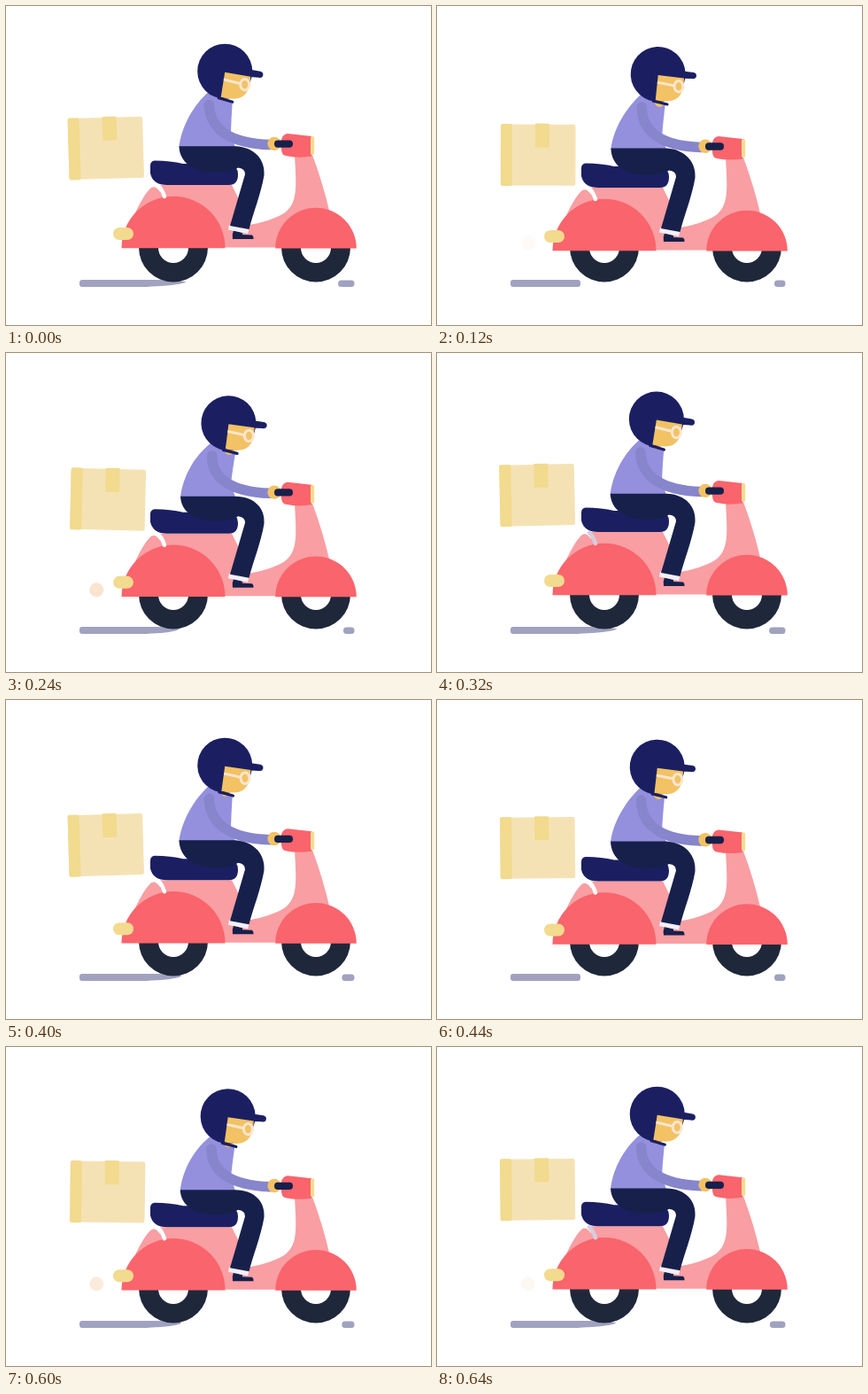
An HTML page with a canvas for the animation above (680 ms loop, 480 by 360 pixels).

```html
<!DOCTYPE html>
<html lang="en">
<head>
<meta charset="utf-8">
<title>Delivery scooter</title>
<style>
  html, body { margin: 0; width: 100%; height: 100%; overflow: hidden; background: #fff; }
  canvas { display: block; }
</style>
</head>
<body>
<canvas id="stage" width="480" height="360"></canvas>
<script>
const ctx = document.getElementById('stage').getContext('2d');
const LOOP = 680, PERIOD = 340, STEP = 40;
const NAVY = '#1b1f62', INK = '#17204b', CORAL = '#fa646c', PINK = '#f99ea2';
const SAND = '#f5e2b4', STRAW = '#f2da8e', SKIN = '#f2c264', SHADOW = '#a0a2c0';

const fill = (color, d) => { ctx.fillStyle = color; ctx.fill(new Path2D(d)); };

function line(color, width, d) {
  ctx.strokeStyle = color;
  ctx.lineWidth = width;
  ctx.lineCap = 'round';
  ctx.stroke(new Path2D(d));
}

function disc(color, x, y, r, start = 0) {
  ctx.fillStyle = color;
  ctx.beginPath();
  ctx.arc(x, y, r, start, 2 * Math.PI);
  ctx.fill();
}

function box(color, x, y, w, h, r = 0) {
  ctx.fillStyle = color;
  ctx.beginPath();
  ctx.roundRect(x, y, w, h, r);
  ctx.fill();
}

function group(x, y, angle, draw) {
  ctx.save();
  ctx.translate(x, y);
  ctx.rotate(angle);
  draw();
  ctx.restore();
}

// 0..1 wave that reaches 1 at the given moment of the bounce
const wave = (t, peak) => 0.5 + 0.5 * Math.cos(2 * Math.PI * (t - peak) / PERIOD);

function shadows(drop) {
  box(SHADOW, 83, 309, 79, 8, 3);
  if (drop < 0.65) {
    const end = 203 - 14 * drop;
    fill(SHADOW, `M155 309H170Q190 309 ${end} 311Q${end} 314 175 316L155 317Z`);
  }
  const left = 381 - 6 * Math.max(0, 1 - 2 * drop);
  box(SHADOW, left, 309.5, 393.5 - left, 7.5, 3.5);
}

function wheel(x) {
  disc('#1f283a', x, 272.5, 39);
  disc('#fff', x, 273, 17);
}

function scooter(phase) {
  fill(PINK, 'M134 262C144 236 154 214 164 205Q169 202 174 210L173 202H255L262 216L266 248Q288 246 306 238C331 228 328 207 326 168H346Q358 200 366 235V272.5H150Z');
  disc(CORAL, 189, 273.2, 58.5, Math.PI);
  disc(CORAL, 350, 273.5, 45.8, Math.PI);
  line(phase > 270 ? '#d5cce0' : '#fff', 4.5, 'M172 203Q176 206 179 215');
  box(STRAW, 121, 250, 23, 14, 7);
  fill(NAVY, 'M168 174.5Q186 174.5 200 178H251Q262 180 262 190Q262 202 252 202H182Q166 202 163 189V180Q163 175 168 174.5Z');
  fill(CORAL, 'M318 144L345 147V169.5Q330 172 316 169Q311 168 311 161V151Q312 145 318 144Z');
  box('#f3dc90', 344, 147, 4.2, 21, 2);
}

// hip and neck are offsets from the resting pose
function rider(hip, neck) {
  const waist = 158 + hip.y, back = 195.3 + hip.x;
  fill(INK, 'M257 253L267 256V258L278 258.5Q280 260 279.5 263H256Q255 258 257 253Z');
  fill('#f3eff8', 'M252 247L274.5 251L273 257L251 252.5Z');
  fill('#9490dd', `M${229 + neck.x} ${96 + neck.y}L${243 + neck.x} ${103 + neck.y}L${255.5 + neck.x} ${107 + neck.y}
    Q${254 + neck.x / 2} 130 254 146L259 ${waist + 1}H${back}C${198 + hip.x} 136 ${211 + neck.x} 112 ${229 + neck.x} ${96 + neck.y}Z`);
  line('#8785cb', 11.5, `M${229 + neck.x} ${111 + neck.y}C${230 + neck.x / 2} 138 252 155 298 156.5`);
  fill(INK, `M${back} ${waist}H259C281 ${159 + hip.y / 2} 293 174 291.5 191C288 212 279 234 274.5 252L253 248L270 190
    Q270 183 262 182.5Q257 187 240 188C214 189 ${196 + hip.x} 178 ${back} ${waist}Z`);
  disc(SKIN, 303, 155.3, 7.7);
  box(INK, 303, 151.4, 21, 8.3, 4);
}

// drawn around the helmet's centre
function head(drop) {
  disc(SKIN, 0, 28 + 4 * drop, 5.5);
  disc(NAVY, 0, 0, 31);
  fill(NAVY, 'M23 -3L40 0Q44 1 43 5Q42 8 38 7L25 6Z');
  fill(SKIN, 'M0 1L29 6Q28 31 10 31Q1 31 -4.5 29Z');
  line('#f9e6cf', 3, 'M0 9.5L16 13.5');
  line('#f9e6cf', 3, 'M17.5 15a5 6.2 0 1 0 10 0a5 6.2 0 1 0 -10 0');
  line(NAVY, 3.2, 'M-7 30L8.5 34.5');
}

function parcel() {
  box(SAND, -42, -34, 84.5, 69, 2);
  box(STRAW, -42, -34.5, 13, 70, 2);
  box(STRAW, -3, -35, 16, 27, 1);
}

function puff(phase) {
  const alpha = Math.min((phase - 100) / 110, (320 - phase) / 80, 1);
  if (alpha <= 0) return;
  ctx.globalAlpha = alpha;
  disc('#f9e4d0', phase < 210 ? 104 : 102.3, 267.3, 8);
  ctx.globalAlpha = 1;
}

function draw(t) {
  const phase = t % PERIOD;
  const drop = wave(t, 160), lag = wave(t, 200);
  const bodyY = 3.4 * drop, headX = 5.3 * lag, headY = 6.9 * lag;

  ctx.fillStyle = '#fff';
  ctx.fillRect(0, 0, 480, 360);
  shadows(drop);
  wheel(189);
  wheel(350);
  puff(phase);
  group(0, bodyY, 0, () => {
    scooter(phase);
    rider(
      { x: 2 * lag, y: 4.4 * lag - bodyY },
      { x: headX * 0.8, y: headY * 0.8 - bodyY }
    );
  });
  group(246.8 + headX, 73.2 + headY, -0.06 * drop, () => head(drop));
  group(112.3 + 3 * lag, 159.8 + 9 * wave(t, 160), (3.7 * lag - 1.9) * Math.PI / 180, parcel);
}

function tick() {
  draw(Math.floor(performance.now() % LOOP / STEP) * STEP);
  requestAnimationFrame(tick);
}
tick();
</script>
</body>
</html>
```
